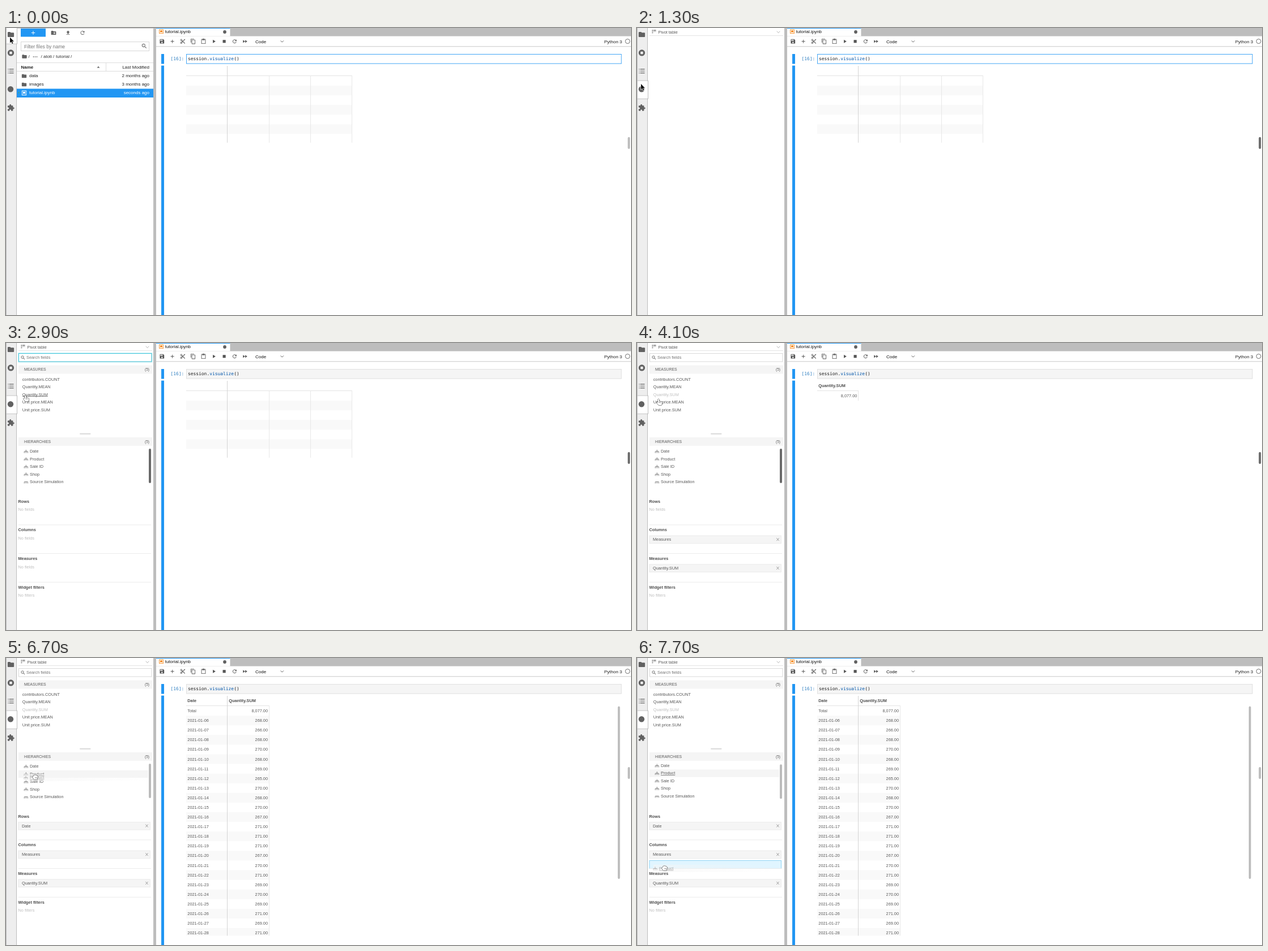
An HTML page with a canvas for the animation above (8000 ms loop, 1103 by 508 pixels).

```html
<!DOCTYPE html>
<html lang="en">
<head>
<meta charset="utf-8">
<title>Notebook pivot table</title>
<style>
html, body { margin: 0; width: 1103px; height: 508px; overflow: hidden; background: #fff; }
canvas { display: block; }
</style>
</head>
<body>
<canvas id="stage" width="1103" height="508"></canvas>
<script>
const ctx = document.getElementById('stage').getContext('2d');
const SANS = '"Liberation Sans", Arial, sans-serif';
const MONO = '"DejaVu Sans Mono", monospace';
const BLUE = '#2196f3', GREY = '#616161', EDGE = '#bdbdbd', PALE = '#f5f5f5', INK = '#595959', FADED = '#bfbfbf';
const UI = 8, SMALL = 7.33;

// Icons on a 24 unit grid
const ICONS = {
  save: 'M17 3H5a2 2 0 00-2 2v14a2 2 0 002 2h14a2 2 0 002-2V7l-4-4zm-5 16a3 3 0 110-6 3 3 0 010 6zm3-10H5V5h10v4z',
  add: 'M19 13h-6v6h-2v-6H5v-2h6V5h2v6h6v2z',
  cut: 'M9.64 7.64c.23-.5.36-1.05.36-1.64a4 4 0 10-4 4c.59 0 1.14-.13 1.64-.36L10 12l-2.36 2.36A4 4 0 1010 18c0-.59-.13-1.14-.36-1.64L12 14l7 7h3v-1zM6 8a2 2 0 110-4 2 2 0 010 4zm0 12a2 2 0 110-4 2 2 0 010 4zM19 3l-6 6 2 2 7-7V3z',
  copy: 'M16 1H4a2 2 0 00-2 2v14h2V3h12zm3 4H8a2 2 0 00-2 2v14a2 2 0 002 2h11a2 2 0 002-2V7a2 2 0 00-2-2zm0 16H8V7h11z',
  paste: 'M19 2h-4.18a3 3 0 00-5.64 0H5a2 2 0 00-2 2v16a2 2 0 002 2h14a2 2 0 002-2V4a2 2 0 00-2-2zm-7 0a1 1 0 110 2 1 1 0 010-2zm7 18H5V4h2v3h10V4h2z',
  play: 'M8 5v14l11-7z',
  stop: 'M6 6h12v12H6z',
  refresh: 'M17.65 6.35A8 8 0 1019.73 14h-2.08A6 6 0 1112 6c1.66 0 3.14.69 4.22 1.78L13 11h7V4z',
  forward: 'M4 18l8.5-6L4 6zM13 6v12l8.5-6z',
  folder: 'M10 4H4a2 2 0 00-2 2v12a2 2 0 002 2h16a2 2 0 002-2V8a2 2 0 00-2-2h-8z',
  newFolder: 'M20 6h-8l-2-2H4a2 2 0 00-2 2v12a2 2 0 002 2h16a2 2 0 002-2V8a2 2 0 00-2-2zm-1 8h-3v3h-2v-3h-3v-2h3V9h2v3h3z',
  upload: 'M9 16h6v-6h4l-7-7-7 7h4zm-4 2h14v2H5z',
  search: 'M15.5 14h-.79l-.28-.27A6.5 6.5 0 1013.73 14.43l.27.28v.79l5 5L20.5 19zm-6 0a4.5 4.5 0 110-9 4.5 4.5 0 010 9z',
  running: 'M12 2a10 10 0 100 20 10 10 0 000-20zM8 8h8v8H8z',
  list: 'M7 5h14v2H7zM7 11h14v2H7zM7 17h14v2H7zM3 5h2v2H3zM3 11h2v2H3zM3 17h2v2H3z',
  puzzle: 'M20.5 11H19V7a2 2 0 00-2-2h-4V3.5a2.5 2.5 0 00-5 0V5H4a2 2 0 00-2 2v3.8h1.5a2.7 2.7 0 010 5.4H2V20a2 2 0 002 2h3.8v-1.5a2.7 2.7 0 015.4 0V22H17a2 2 0 002-2v-4h1.5a2.5 2.5 0 000-5z',
  notebook: 'M2 2h20v20H2zM4 4v16h16V4zM7 7h10v10l-5-4-5 4z',
  pivot: 'M3 4h5v4H3zM10 4h11v4H10zM3 10h5v3H3zM3 15h5v4H3zM10 10h11v2H10z',
};
for (const name in ICONS) ICONS[name] = new Path2D(ICONS[name]);

const POINTERS = {
  arrow: new Path2D('M0 0v10l2.3-2.2 1.6 3.6 1.6-.7-1.6-3.5h3.1z'),
  hand: new Path2D('M-1 6V1a1 1 0 012 0v3l4 .8q1.5.4 1.3 2l-.7 4.2H0l-3-4q-.8-1.3 1-1.6z'),
  grab: new Path2D('M-3 7q-2-1-1-2.5l1-.3q0-3 2-2.8 1-1 2 0 1.6-.6 2 .5 2 0 2 2l-.6 5.1h-6z'),
};

// Pointer moves: first step, last step, x, y, shape
const MOVES = [
  [0, 0, 7, 16.5, 'arrow'], [300, 800, 6.5, 89.5, 'arrow'], [900, 1100, 7, 99, 'arrow'],
  [2300, 2600, 24, 95, 'arrow'], [2900, 2900, 34, 92.5, 'hand'], [4100, 4100, 38, 99, 'hand'],
  [4300, 4300, 43, 110, 'hand'], [4500, 4500, 47, 149, 'arrow'], [4700, 4700, 48, 166, 'arrow'],
  [4900, 5300, 51.5, 190, 'hand'], [5800, 5800, 51, 197, 'hand'], [6000, 6100, 50.5, 203, 'hand'],
  [6700, 6700, 51, 206, 'grab'], [7000, 7000, 49, 253, 'grab'], [7200, 7200, 48.5, 344, 'grab'],
  [7400, 7400, 49, 368, 'grab'], [7700, 7700, 48, 367, 'grab'],
];

const MEASURES = ['contributors.COUNT', 'Quantity.MEAN', 'Quantity.SUM', 'Unit price.MEAN', 'Unit price.SUM'];
const HIERARCHIES = ['Date', 'Product', 'Sale ID', 'Shop', 'Source Simulation'];
const DAILY = [268, 266, 268, 270, 268, 269, 265, 270, 268, 270, 267, 271,
  271, 271, 267, 270, 271, 269, 270, 269, 271, 269, 271];

function box(x, y, w, h, color) {
  ctx.fillStyle = color;
  ctx.fillRect(x, y, w, h);
}
function frame(x, y, w, h, color, fill) {
  if (fill) box(x, y, w, h, fill);
  ctx.strokeStyle = color;
  ctx.lineWidth = 1;
  ctx.strokeRect(x + .5, y + .5, w - 1, h - 1);
}
function pill(x, y, w, h, color) {
  ctx.fillStyle = color;
  ctx.beginPath();
  ctx.roundRect(x, y, w, h, Math.min(w, h) / 2);
  ctx.fill();
}
function dot(x, y, r, color) {
  pill(x - r, y - r, 2 * r, 2 * r, color);
}
function line(path, x, y, color, width = .8) {
  ctx.save();
  ctx.translate(x, y);
  ctx.strokeStyle = color;
  ctx.lineWidth = width;
  ctx.stroke(new Path2D(path));
  ctx.restore();
}
// y is the middle of the capital letters
function text(str, x, y, { size = SMALL, color = INK, bold = false, align = 'left', font = SANS, underline = false } = {}) {
  ctx.font = `${bold ? 'bold ' : ''}${size}px ${font}`;
  ctx.textAlign = align;
  ctx.fillStyle = color;
  ctx.fillText(str, x, y + size * .35);
  if (underline) box(x, y + size * .35 + .8, ctx.measureText(str).width, .7, color);
}
function icon(name, x, y, size = 12, color = GREY) {
  ctx.save();
  ctx.translate(x - size / 2, y - size / 2);
  ctx.scale(size / 24, size / 24);
  ctx.fillStyle = color;
  ctx.fill(ICONS[name], 'evenodd');
  ctx.restore();
}

function pointerAt(t) {
  let [, , x, y, shape] = MOVES[0];
  for (const [from, to, nx, ny, nextShape] of MOVES) {
    if (t < from) break;
    const k = Math.min(1, (t - from + 100) / (to - from + 100));
    x += (nx - x) * k;
    y += (ny - y) * k;
    shape = nextShape;
  }
  return { x, y, shape };
}
function drawPointer({ x, y, shape }) {
  ctx.save();
  ctx.translate(x, y);
  const arrow = shape === 'arrow';
  ctx.lineWidth = arrow ? 1.2 : 1;
  ctx.lineJoin = 'round';
  ctx.strokeStyle = arrow ? '#fff' : '#222';
  ctx.fillStyle = arrow ? '#111' : '#fff';
  ctx.stroke(POINTERS[shape]);
  ctx.fill(POINTERS[shape]);
  if (!arrow) line('M1.2 5v2M3.2 5.3v2', 0, 0, '#222', .6);
  ctx.restore();
}

function sidebar(t, pointer) {
  box(0, 0, 19, 508, '#eee');
  box(18, 0, 1, 508, EDGE);
  const tab = i => -4.5 + 32.4 * i;
  const active = t < 1300 ? 0 : 3;
  const hover = t < 2400 ? Math.floor((pointer.y + 4.5) / 32.4) : active;
  if (hover !== active) box(1, tab(hover), 17, 32.4, '#fff');
  frame(0, tab(active), 20, 33, EDGE);
  box(1, tab(active) + 1, 18, 31, '#fff');
  box(0, 0, 1, 508, EDGE);
  ['folder', 'running', 'list', null, 'puzzle'].forEach((name, i) => {
    const y = 11.5 + 32.4 * i;
    if (name) icon(name, 8.5, y, 13.5);
    else dot(8, y - .5, 5.2, GREY);
  });
}

function fileBrowser() {
  box(19, 0, 241, 1, '#ccc');
  box(26, 1, 44, 14.5, BLUE);
  icon('add', 48, 8.5, 11, '#fff');
  icon('newFolder', 84, 8.5, 10.5);
  icon('upload', 109.5, 8.5, 10.5);
  icon('refresh', 135, 8.5, 10.5);
  frame(26, 24, 227, 17, '#d8d8d8');
  text('Filter files by name', 32, 33, { size: 8.6, color: '#777' });
  icon('search', 244, 32, 11.5);
  icon('folder', 32.5, 50.5, 10);
  [['/', 39.5], ['/', 61.5], ['atoti', 66], ['/', 83], ['tutorial', 88], ['/', 114]]
    .forEach(([s, x]) => text(s, x, 50.5, { size: UI, color: '#333' }));
  [48.5, 51.5, 54.5].forEach(x => dot(x, 51, .8, '#333'));

  box(19, 61, 241, 1, '#ddd');
  box(19, 76, 241, 1, '#ddd');
  box(176, 62, 1, 14, '#ddd');
  text('Name', 26.5, 69, { size: UI, bold: true, color: '#222' });
  ctx.fillStyle = GREY;
  ctx.fill(new Path2D('M160.5 70.5h5l-2.5-2.7z'));
  text('Last Modified', 253, 69, { size: UI, align: 'right', color: '#222' });

  [['data', '2 months ago'], ['images', '3 months ago'], ['tutorial.ipynb', 'seconds ago']].forEach(([name, age], i) => {
    const y = 84.5 + 15 * i, selected = i === 2;
    if (selected) box(19, 107.5, 241, 15.5, BLUE);
    const color = selected ? '#fff' : '#222';
    icon(selected ? 'notebook' : 'folder', 32, y + .5, 10, selected ? '#fff' : GREY);
    text(name, 41, y, { size: UI, color });
    text(age, 253, y, { size: UI, color, align: 'right' });
  });
  dot(22.5, 114.5, .9, '#4caf50');
}

function groupBar(title, y) {
  box(22, y - 7.5, 236, 15, PALE);
  text(title, 32, y, { size: 6.9 });
  text('(5)', 253, y, { size: 6.5, align: 'right' });
}
function treeIcon(x, y, stem, color) {
  line(`M-3 3.2v-3h6v3M0 ${stem ? -2.8 : .2}V3.2`, x, y, color);
}
function chip(label, y) {
  frame(21.5, y, 233.5, 14.5, '#ececec', PALE);
  text(label, 28, y + 7);
  line('M-2.2-2.5l4.4 5M2.2-2.5l-4.4 5', 248.5, y + 7, '#777', .7);
}
function dropZone(y) {
  frame(21.5, y, 233.5, 15, '#91d5f5', '#e0f5ff');
}

function fieldPanel(t) {
  icon('pivot', 30, 6.5, 9.5, '#888');
  text('Pivot table', 37.5, 7);
  line('M-2.7-1.5L0 1.8 2.7-1.5', 249.5, 7, '#aaa');
  box(22, 13, 236, 1, '#e4e4e4');
  if (t < 1500) return;

  const focus = t < 3200 ? Math.min(1, (t - 1400) / 300) : 0;
  frame(22, 18, 235.5, 15.5, '#d9d9d9');
  if (focus) {
    ctx.globalAlpha = focus;
    frame(21, 17, 237.5, 17.5, '#d3f3f8');
    frame(22, 18, 235.5, 15.5, '#3bc5da');
    ctx.globalAlpha = 1;
  }
  icon('search', 30, 26, 9.5);
  text('Search fields', 36, 25.7, { color: '#757575' });
  if (t >= 1600 && t < 2900) box(36, 21.5, .8, 8, '#222');

  const measured = t >= 3400, dated = t >= 5300, dragging = t >= 6700;
  const hovered = t >= 6000 ? 'Product' : t >= 4900 ? 'Date'
    : t >= 4300 && t < 4500 ? 'Unit price.MEAN'
    : t >= 2900 && t < 3400 ? 'Quantity.SUM' : '';

  groupBar('MEASURES', 47);
  MEASURES.forEach((name, i) => text(name, 28.7, 64 + 13.5 * i,
    { color: measured && i === 2 ? FADED : INK, underline: name === hovered }));
  pill(130, 159.8, 19.5, 2, '#d9d9d9');

  groupBar('HIERARCHIES', 174.5);
  const shift = t >= 7200 ? 1.3 : 0;
  HIERARCHIES.forEach((name, i) => {
    const y = 191.7 + 13.45 * i - shift;
    if (dated && i === (dragging ? 1 : 0)) box(22, y - 6.5, 229, 13.4, PALE);
    treeIcon(35.3, y, i < 4, '#666');
    text(name, 42, y, { underline: name === hovered });
  });
  pill(252, 187 + shift, 4, 61, dragging ? '#bbb' : '#696969');

  const columns = measured ? ['Measures'] : [];
  [['Rows', dated ? 'Date' : ''], ['Columns', measured ? 'Measures' : ''],
    ['Measures', measured ? 'Quantity.SUM' : ''], ['Widget filters', '']].forEach(([title, field], i) => {
    const y = 280 + 50.7 * i;
    if (i) box(22, y - 9.3, 234, 1, '#ebebeb');
    const above = i === 1 && t >= 7200 && t < 7400;
    if (above) dropZone(341);
    if (field) chip(field, y + 10 + (above ? 17 : 0));
    else text(i === 3 ? 'No filters' : 'No fields', 21.5, y + 14.8, { color: FADED });
    if (i === 1 && t >= 7400) dropZone(358);
    text(title, 21.5, y, { bold: true, color: '#4d4d4d' });
  });
}

function dragGhost({ x, y }) {
  const left = x - 19, mid = y + 5.3;
  const fade = ctx.createLinearGradient(left, 0, left + 215, 0);
  fade.addColorStop(0, 'rgba(245,245,245,.6)');
  fade.addColorStop(1, 'rgba(245,245,245,0)');
  box(left, mid - 6.5, 215, 13, fade);
  ctx.globalAlpha = .5;
  treeIcon(x - 16, mid, true, '#666');
  text('Product', x - 9, mid, { underline: true });
  ctx.globalAlpha = 1;
}

function notebook(t) {
  box(260, 0, 5, 508, EDGE);
  box(265, 0, 838, 14.5, EDGE);
  box(265, 0, 130.5, 14.5, '#fff');
  box(265, 0, 130.5, 1, BLUE);
  icon('notebook', 274, 6.3, 9, '#f57c00');
  text('tutorial.ipynb', 280.7, 6.3, { size: UI, color: '#111' });
  dot(386, 7, 2.9, GREY);

  ['save', 'add', 'cut', 'copy', 'paste', 'play', 'stop', 'refresh', 'forward']
    .forEach((name, i) => icon(name, 275.3 + 18.3 * i, 23.7, 10.3, '#555'));
  text('Code', 440, 23.7, { size: UI, color: '#111' });
  line('M-2.6-1.3L0 1.4 2.6-1.3', 487.3, 23.7, GREY, 1);
  text('Python 3', 1055.7, 23.7, { size: UI, color: '#222' });
  line('M4 0a4 4 0 10-8 0 4 4 0 108 0', 1097, 23.5, GREY, .9);
  box(265, 32, 838, 1, '#d6d6d6');
  box(265, 33, 838, 1, '#f0f0f0');

  box(274, 46, 5, 17.5, BLUE);
  box(274, 66.5, 5, 442, BLUE);
  const editing = t < 1500;
  frame(318, 46, 768.5, 17.5, editing ? '#42a5f5' : '#e0e0e0', editing ? '#fff' : PALE);
  const code = { size: 7.93, font: MONO };
  text('[16]:', 290.5, 54.7, { ...code, color: '#307fc1' });
  [['session.', 0, '#212121'], ['visualize', 8, '#0055aa'], ['()', 17, '#212121']]
    .forEach(([s, col, color]) => text(s, 321 + col * 4.774, 54.7, { ...code, color }));

  pill(1097.3, 193, 3.9, 21, t >= 1300 && t < 6700 ? '#696969' : '#bbb');
}

function pivotTable(t) {
  const pitch = 17.09, top = 85, rule = '#e3e3e3';
  const rowMid = i => 93.5 + pitch * i;
  const stripe = (i, width) => i % 2 && box(318, top + pitch * i, width, pitch, '#f9f9f9');
  const right = { align: 'right' }, head = { bold: true, color: '#4d4d4d' };

  if (t < 3400) {
    for (let i = 0; i < 7; i++) stripe(i, 293);
    box(318, 84, 293, 1, rule);
    [464, 537, 610].forEach(x => box(x, 84, 1, 119, '#e8e8e8'));
    box(390, 67, 1, 136, '#d4d4d4');
  } else if (t < 5300) {
    text('Quantity.SUM', 320.3, 75.5, head);
    box(318, 84, 73, 1, rule);
    box(390, 84, 1, 18, rule);
    text('8,077.00', 388.3, 93.5, right);
  } else {
    ctx.save();
    ctx.beginPath();
    ctx.rect(318, 66, 768, 425.5);
    ctx.clip();
    for (let i = 0; i <= DAILY.length; i++) {
      stripe(i, 146);
      text(i ? '2021-01-' + String(i + 5).padStart(2, '0') : 'Total', 320.3, rowMid(i));
      text(i ? DAILY[i - 1] + '.00' : '8,077.00', 462, rowMid(i), right);
    }
    text('Date', 320.3, 75.5, head);
    text('Quantity.SUM', 393.3, 75.5, head);
    box(318, 84, 146.5, 1, rule);
    box(390, 67, 1, 425, '#d4d4d4');
    box(464, 84, 1, 408, '#e8e8e8');
    pill(1079.7, 85.5, 3.8, 305.5, t < 6700 ? '#696969' : '#bbb');
    ctx.restore();
  }
}

function draw(now) {
  const t = Math.floor(now % 8000 / 100) * 100;
  const pointer = pointerAt(t);
  box(0, 0, 1103, 508, '#fff');
  if (t < 1300) fileBrowser();
  else fieldPanel(t);
  sidebar(t, pointer);
  notebook(t);
  pivotTable(t);
  if (pointer.shape === 'grab') dragGhost(pointer);
  drawPointer(pointer);
}

const start = performance.now();
function tick() {
  draw(performance.now() - start);
  requestAnimationFrame(tick);
}
tick();
</script>
</body>
</html>
```
